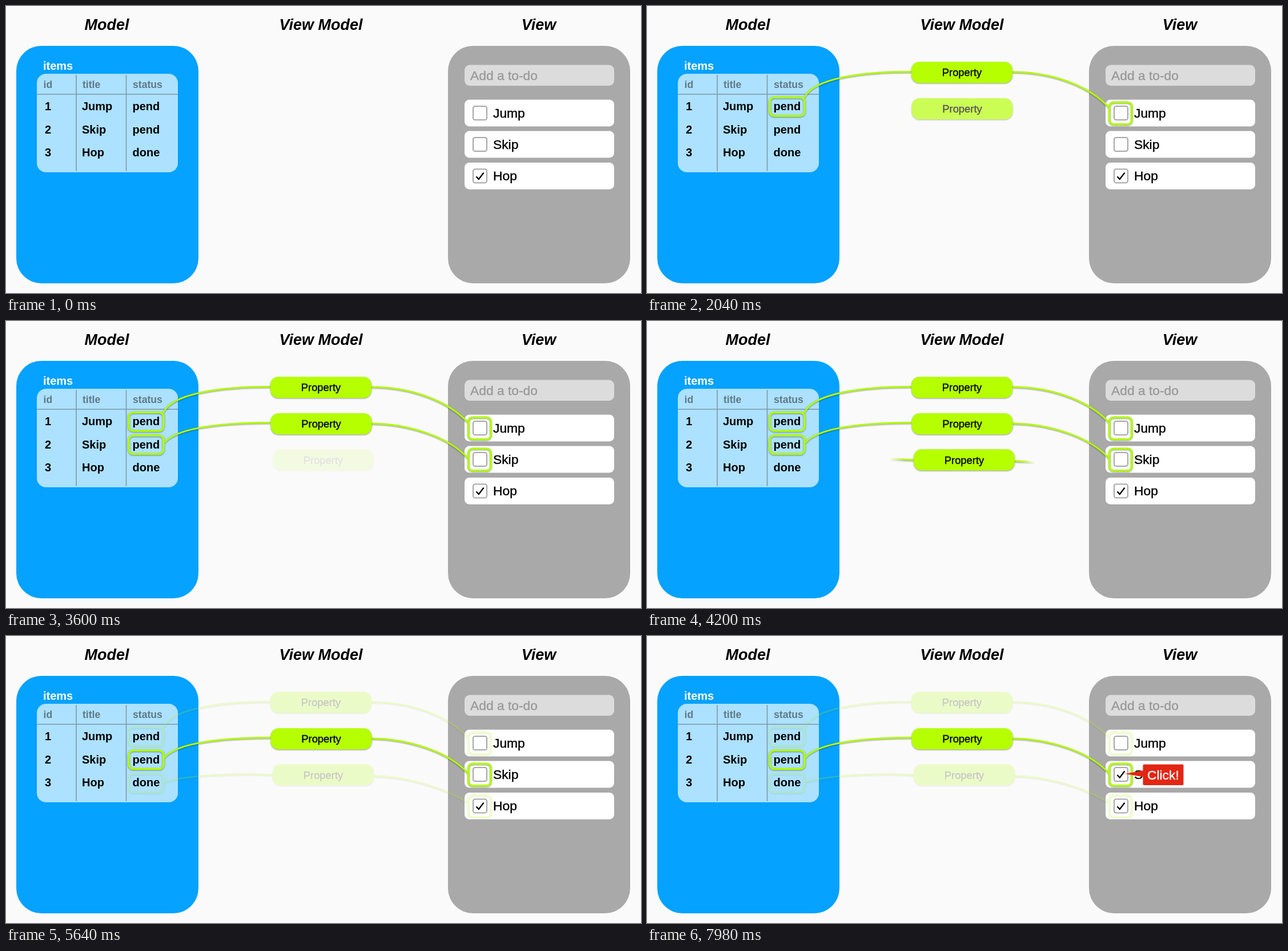
Animation, 1112 px wide and 504 px high, one loop 8000 ms. Source, as an HTML page:

```html
<!DOCTYPE html>
<html lang="en">
<head>
<meta charset="utf-8">
<title>Model, View Model, View</title>
<style>
  html, body { margin: 0; height: 100%; overflow: hidden; background: #fafafa; }
  svg { display: block; width: 100vw; height: 100vh; font-family: "Liberation Sans", Arial, sans-serif; }
  .head { font: italic bold 27px "Liberation Sans", Arial, sans-serif; text-anchor: middle; }
  .cell { font-size: 20px; font-weight: bold; }
  .column { font-size: 17.6px; font-weight: bold; fill: #607885; }
  .medium { font-size: 22.8px; stroke: currentColor; fill: currentColor; stroke-width: .4; }
  .pill text { font-size: 18.4px; text-anchor: middle; stroke: #000; stroke-width: .35; }
  .pill rect { fill: #b5ff00; filter: drop-shadow(0 1.5px 1.2px rgba(0, 0, 0, .4)); }
  .wire { fill: none; stroke: #b2fa05; stroke-width: 3; filter: drop-shadow(0 1.5px 1px rgba(0, 0, 0, .4)); }
  .wire rect { stroke-width: 3.6; }
  .tick { fill: none; stroke: #000; stroke-width: 2.3; }
</style>
</head>
<body>
<svg id="stage" viewBox="0 0 1112 504"></svg>
<script>
const LOOP = 8000;
const FIRST_WIRE = 538, STEP = 1723, WIPE = 853;
const PILL_LEAD = 460, PILL_FADE = 400;
const DIM_START = 5050, DIM_TIME = 500, DIM_OPACITY = .2;
const CLICK_AT = 6800, CLICK_FADE = 140, CHECK_AT = 7740;
const SOFT = 25, MASK_X = 150, MASK_W = 760;

const items = [
  { title: 'Jump', status: 'pend', row: 183, box: 160.5, y: 188, pill: [463, 98],
    left: 'M463 115.5C380 115.5 290 126 275 162', right: 'M640 116C705 116 772 138 809 178' },
  { title: 'Skip', status: 'pend', row: 223.5, box: 201, y: 243, pill: [463.5, 162],
    left: 'M463 178.5C385 179 300 186 277 214', right: 'M640 180C705 181 775 203 809 241' },
  { title: 'Hop', status: 'done', row: 264, box: 242, y: 298.5, pill: [467, 225.3],
    left: 'M467 244C410 241 330 243 277 256', right: 'M644 246C700 247 765 265 809 293' },
];

const text = (x, y, content, cls, attrs = '') => `<text x="${x}" y="${y}" class="${cls}" ${attrs}>${content}</text>`;
const rect = (x, y, w, h, r, attrs = '') => `<rect x="${x}" y="${y}" width="${w}" height="${h}" rx="${r}" ${attrs}/>`;
const tick = (y, attrs = '') => `<path class="tick" d="M823.5 ${y + 1}l4.3 4.8 8.7-11.6" ${attrs}/>`;

const tableRow = (item, i) =>
  text(68, item.row, i + 1, 'cell') + text(133, item.row, item.title, 'cell') + text(221.5, item.row, item.status, 'cell');

const todo = ({ title, y }, i) =>
  rect(803, y - 23.5, 262, 47, 8.5, 'fill="#fff"') +
  rect(818, y - 12, 24, 24, 3.5, 'fill="#fff" stroke="#a6a6a6" stroke-width="2"') +
  (i === 0 ? '' : tick(y, i === 1 ? 'id="check"' : '')) +
  text(853, y + 7.7, title, 'medium');

const binding = ({ pill: [x, y], left, right, box, y: mid }, i) => `
  <linearGradient id="edge${i}" gradientUnits="userSpaceOnUse" x1="${MASK_X}" x2="${MASK_X + MASK_W}">
    <stop stop-color="#000"/><stop stop-color="#fff"/><stop stop-color="#fff"/><stop stop-color="#000"/>
  </linearGradient>
  <mask id="wipe${i}" maskUnits="userSpaceOnUse" x="${MASK_X}" y="0" width="${MASK_W}" height="504">
    ${rect(MASK_X, 0, MASK_W, 504, 0, `fill="url(#edge${i})"`)}
  </mask>
  <g id="binding${i}">
    <g mask="url(#wipe${i})"><g class="wire">
      <path d="${left}"/><path d="${right}"/>
      ${rect(215, box, 61, 32.5, 8)}${rect(810, mid - 18.8, 39, 38.5, 7)}
    </g></g>
    <g class="pill" id="pill${i}">${rect(x, y, 177, 37.3, 14)}${text(x + 88.5, y + 25.3, 'Property', '')}</g>
  </g>`;

const stage = document.getElementById('stage');
stage.innerHTML =
  text(176.5, 42, 'Model', 'head') + text(551.5, 42, 'View Model', 'head') + text(933, 42, 'View', 'head') +
  rect(18, 70, 319, 417, 44, 'fill="#05a2ff"') +
  text(65, 112, 'items', 'cell', 'fill="#fff"') +
  rect(54, 119, 247, 173, 16, 'fill="#ace1ff"') +
  '<path d="M54 155H301M123 121V290M210.5 121V290" stroke="#7f98a5" stroke-width="1.6"/>' +
  text(65.5, 144, 'id', 'column') + text(134, 144, 'title', 'column') + text(222, 144, 'status', 'column') +
  items.map(tableRow).join('') +
  rect(774, 70, 319, 417, 44, 'fill="#a9a9a9"') +
  rect(803, 103.5, 262, 36.5, 9, 'fill="#dcdcdc"') +
  text(813, 130, 'Add a to-do', 'medium', 'color="#999"') +
  items.map(todo).join('') +
  items.map(binding).join('') +
  '<g id="click"><path d="M837 242L869.5 236V247.5Z" fill="#e32613"/>' +
  rect(868.5, 225.5, 71, 36.5, 2, 'fill="#e32613"') +
  text(876, 251.5, 'Click!', 'medium', 'color="#fff"') + '</g>';

const find = id => document.getElementById(id);
const parts = items.map((item, i) => ({
  group: find('binding' + i), pill: find('pill' + i), stops: find('edge' + i).children,
}));
const check = find('check'), click = find('click');

const progress = (t, start, time) => Math.min(1, Math.max(0, (t - start) / time));
const ease = p => (1 - Math.cos(Math.PI * p)) / 2;

function draw(t) {
  const dim = 1 - (1 - DIM_OPACITY) * ease(progress(t, DIM_START, DIM_TIME));
  parts.forEach(({ group, pill, stops }, i) => {
    const start = FIRST_WIRE + i * STEP;
    const p = ease(progress(t, start, WIPE));
    const x = items[i].pill[0];
    const leftEdge = x - p * (255 + SOFT);
    const rightEdge = x + 177 + p * (214 + SOFT);
    [leftEdge, leftEdge + SOFT, rightEdge - SOFT, rightEdge].forEach((edge, k) =>
      stops[k].setAttribute('offset', (edge - MASK_X) / MASK_W));
    // Wires stay hidden until their wipe begins.
    group.firstElementChild.style.visibility = p > 0 ? 'visible' : 'hidden';
    pill.style.opacity = ease(progress(t, start - PILL_LEAD, PILL_FADE));
    group.style.opacity = i === 1 ? 1 : dim;
  });
  click.style.opacity = progress(t, CLICK_AT, CLICK_FADE);
  check.style.visibility = t >= CHECK_AT ? 'visible' : 'hidden';
}

const begin = performance.now();
function frame() {
  draw((performance.now() - begin) % LOOP);
  requestAnimationFrame(frame);
}
frame();
</script>
</body>
</html>
```
